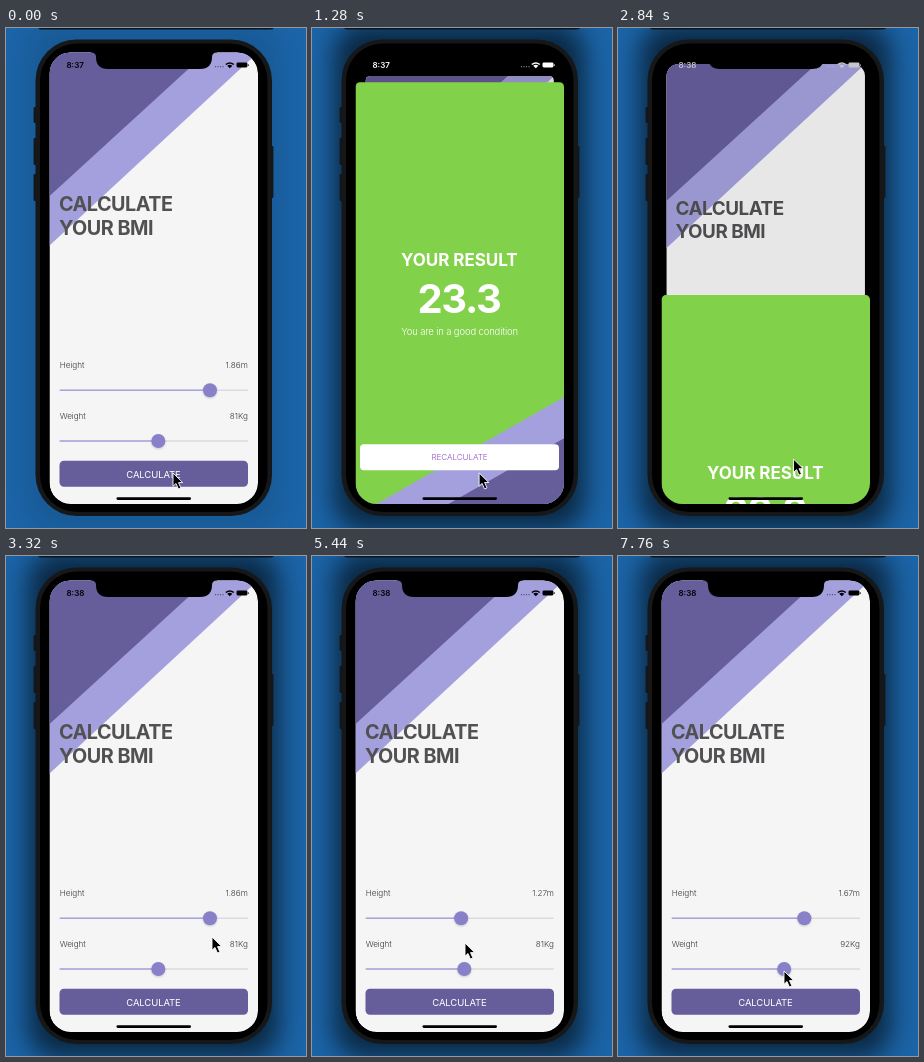
Write an HTML page that moves like this. It is 300 by 500 pixels and loops after 8 s.

```html
<!DOCTYPE html>
<html lang="en">
<head>
<meta charset="utf-8">
<title>BMI calculator</title>
<style>
html, body { margin: 0; width: 100%; height: 100%; overflow: hidden; background: #1b64a7; }
svg { display: block; width: 300px; height: 500px; }
text { font-family: Inter, "Open Sans", sans-serif; }
.title { font-size: 19.8px; font-weight: 700; letter-spacing: -.5px; fill: #515154; }
.label { font-size: 8.2px; font-weight: 300; letter-spacing: -.05px; fill: #3c3c3c; }
.end { text-anchor: end; }
.mid { text-anchor: middle; }
</style>
</head>
<body>
<svg viewBox="0 0 300 500" xmlns="http://www.w3.org/2000/svg">
  <defs>
    <clipPath id="screen"><rect x="43.5" y="24.5" width="208.5" height="451.5" rx="21"/></clipPath>
    <clipPath id="pageClip"><rect id="pageShape" x="43.5" y="24" width="208.5" height="452"/></clipPath>
    <filter id="blur" x="-40%" y="-20%" width="180%" height="140%"><feGaussianBlur stdDeviation="13"/></filter>
    <filter id="soft" x="-50%" y="-50%" width="200%" height="200%"><feGaussianBlur stdDeviation="1.2"/></filter>
  </defs>

  <rect width="300" height="500" fill="#1b64a7"/>
  <rect id="shadow" x="22" y="-4" width="251" height="506" rx="30" filter="url(#blur)"/>
  <path d="M32 0H268Q267 1.6 264 1.6H36Q33 1.6 32 0Z" fill="#0b1520"/>

  <g fill="#14171a">
    <rect x="27.6" y="79" width="5" height="16" rx="1.2"/>
    <rect x="27.6" y="110" width="5" height="27" rx="1.2"/>
    <rect x="27.6" y="146" width="5" height="27" rx="1.2"/>
    <rect x="262.4" y="118" width="5" height="52" rx="1.2"/>
  </g>
  <rect x="29.5" y="11.5" width="236.5" height="476.5" rx="41" fill="#161718"/>
  <rect x="34" y="15.5" width="227.5" height="468.5" rx="37" fill="#000"/>

  <g clip-path="url(#screen)">
    <rect x="43" y="24" width="210" height="453" fill="#000"/>

    <g id="page"><g clip-path="url(#pageClip)">
      <rect x="43" y="24" width="210" height="453" fill="#f5f5f5"/>
      <path d="M43 24H252.5L43 218Z" fill="#a4a0dd"/>
      <path d="M43 24H201L43 168.5Z" fill="#665d9b"/>
      <text class="title" x="53" y="183">CALCULATE</text>
      <text class="title" x="53" y="207">YOUR BMI</text>
      <text class="label" x="53.7" y="340">Height</text>
      <text class="label end" id="heightText" x="241.8" y="340"></text>
      <text class="label" x="53.7" y="390.5">Weight</text>
      <text class="label end" id="weightText" x="241.8" y="390.5"></text>
      <g id="heightSlider" transform="translate(0 362.3)"></g>
      <g id="weightSlider" transform="translate(0 413)"></g>
      <rect x="53.5" y="432.8" width="188.5" height="26" rx="4.5" fill="#665d9b"/>
      <text class="mid" x="147.5" y="449.7" font-size="9.5" letter-spacing="-.1" fill="#fff">CALCULATE</text>
      <rect id="dim" x="43" y="24" width="210" height="453"/>
    </g></g>

    <g id="sheet">
      <rect x="43.5" y="54" width="208.5" height="440" rx="4.5" fill="#82d14a"/>
      <path d="M252 368.8V476H64Z" fill="#a4a0dd"/>
      <path d="M252 410V476H136Z" fill="#665d9b"/>
      <g class="mid" fill="#fff">
        <text x="147.3" y="237.8" font-size="17" font-weight="700" letter-spacing="-.05">YOUR RESULT</text>
        <text x="147" y="284.5" font-size="40" font-weight="700" letter-spacing="-1.3">23.3</text>
        <text x="147.6" y="307" font-size="9.5" font-weight="300" letter-spacing="-.15">You are in a good condition</text>
      </g>
      <rect x="48" y="416" width="199" height="26" rx="4" fill="#fff"/>
      <text class="mid" x="147.5" y="432" font-size="8.2" font-weight="300" letter-spacing="-.1" fill="#9053c4">RECALCULATE</text>
    </g>

    <rect x="110.5" y="469.3" width="74.5" height="2.6" rx="1.3" fill="#000"/>
  </g>

  <path d="M85 23V24.5Q90 24.5 90 29Q90 41 102 41H194Q206 41 206 29Q206 24.5 211 24.5V23Z"/>
  <g id="status">
    <text id="clock" x="60.5" y="40" font-size="8" font-weight="600"></text>
    <g opacity=".55">
      <circle cx="209.5" cy="38.7" r=".65"/><circle cx="212" cy="38.7" r=".65"/>
      <circle cx="214.5" cy="38.7" r=".65"/><circle cx="217" cy="38.7" r=".65"/>
    </g>
    <path d="M219.3 36Q223.8 32.3 228.3 36L227.2 37.1Q223.8 34.4 220.4 37.1ZM221.2 37.8Q223.800 35.9 226.4 37.8L223.8 40.2Z"/>
    <rect x="230.5" y="34.5" width="11" height="5" rx="1.4"/>
    <rect x="242.1" y="36" width=".8" height="2" rx=".4"/>
  </g>

  <path id="cursor" d="M0 0V13.3L3 10.5L5.4 16L7.9 14.9L5.5 9.6H9.7Z" fill="#000" stroke="#fff" stroke-width=".9" stroke-linejoin="round"/>
</svg>
<script>
const LOOP = 8000;
const $ = id => document.getElementById(id);
const set = (node, attrs) => {
  for (const name in attrs) node.setAttribute(name, attrs[name]);
};

// Steps: [time, value, ...]
const CURSOR = [
  [1260, 167, 445], [1520, 173, 440], [1660, 173, 440], [2050, 174, 432], [2480, 175, 432],
  [2800, 175, 432], [3280, 206, 381], [3340, 206, 381], [3720, 208, 364], [4080, 198, 368],
  [4220, 198, 368], [4680, 176, 376], [4820, 176, 376], [4880, 175, 376], [5020, 175, 376],
  [5440, 153, 387], [5840, 168, 382], [6400, 183, 370], [6640, 183, 370], [6920, 152, 415],
  [7160, 158, 415], [7300, 158, 415], [7520, 166, 415]
];
const HEIGHT = [
  [3720, 1.86], [4080, 1.755], [4220, 1.755], [4680, 1.52], [4820, 1.52], [4880, 1.51],
  [5020, 1.51], [5440, 1.27], [5840, 1.43], [6400, 1.67]
];
const WEIGHT = [[6920, 81], [7160, 85.7], [7300, 85.7], [7520, 92]];

const clamp = x => Math.min(1, Math.max(0, x));
const ease = x => (1 - Math.cos(Math.PI * x)) / 2;

function sample(steps, t) {
  const next = steps.findIndex(step => step[0] > t);
  if (next === 0) return steps[0].slice(1);
  if (next < 0) return steps[steps.length - 1].slice(1);
  const a = steps[next - 1], b = steps[next];
  const k = ease((t - a[0]) / (b[0] - a[0]));
  return a.slice(1).map((v, i) => v + (b[i + 1] - v) * k);
}

// Critically damped spring from 0 to 1.
function spring(ms, rate) {
  const x = Math.max(0, ms) / 1000 * rate;
  return 1 - (1 + x) * Math.exp(-x);
}

function makeSlider(id) {
  const root = $(id);
  const add = (tag, attrs) => {
    const node = document.createElementNS("http://www.w3.org/2000/svg", tag);
    set(node, attrs);
    return root.appendChild(node);
  };
  const bar = { x: 53.5, y: -0.8, height: 1.6, rx: 0.8 };
  add("rect", { ...bar, width: 188.5, fill: "#dcdcde" });
  const fill = add("rect", { ...bar, fill: "#aaa5da" });
  const shade = add("circle", { cy: 1, r: 7, opacity: 0.18, filter: "url(#soft)" });
  const thumb = add("circle", { cy: 0, r: 7, fill: "#8881c9" });
  return x => {
    set(fill, { width: x - 53.5 });
    set(shade, { cx: x });
    set(thumb, { cx: x });
  };
}

const moveHeight = makeSlider("heightSlider");
const moveWeight = makeSlider("weightSlider");

function draw(t) {
  const closing = t >= 2720;
  let open = closing ? 1 - spring(t - 2720, 14) : spring(t - 480, 12.45);
  if (t >= 3300) open = 0;

  set($("sheet"), {
    transform: `translate(0 ${422 * (1 - open)})`,
    visibility: open > 0 ? "visible" : "hidden"
  });
  set($("page"), {
    transform: `translate(147.75 ${24 + 24 * open}) scale(${1 - 0.098 * open}) translate(-147.75 -24)`
  });
  set($("pageShape"), { rx: 21 - 16 * open });
  set($("dim"), { opacity: 0.12 * open });

  const light = closing ? 1 - clamp((t - 2760) / 360) : clamp((t - 560) / 360);
  const grey = Math.round(255 * light);
  set($("status"), { fill: `rgb(${grey},${grey},${grey})` });
  $("clock").textContent = t < 1680 ? "8:37" : "8:38";
  set($("shadow"), { opacity: t < 440 ? 0.1 : 0.6 });

  const [height] = sample(HEIGHT, t);
  const [weight] = sample(WEIGHT, t);
  moveHeight(204 + (height - 1.86) * 93);
  moveWeight(152.3 + (weight - 81) * 1.26);
  $("heightText").textContent = height.toFixed(2) + "m";
  $("weightText").textContent = Math.round(weight) + "Kg";

  const [x, y] = sample(CURSOR, t);
  set($("cursor"), { transform: `translate(${x} ${y})` });
}

const start = performance.now();
function tick() {
  draw((performance.now() - start) % LOOP);
  requestAnimationFrame(tick);
}
tick();
</script>
</body>
</html>
```
